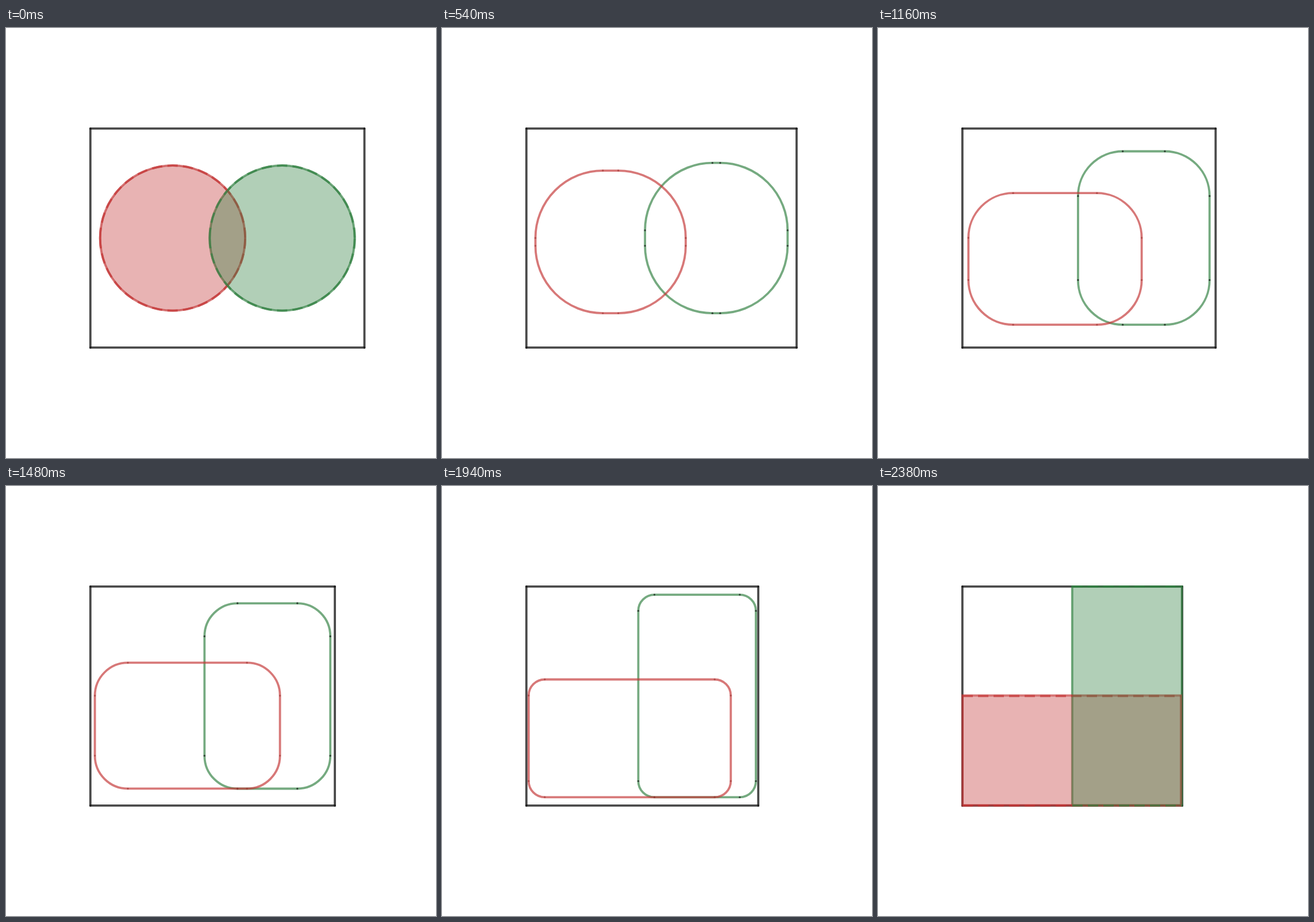
Write an HTML page with a canvas that moves like this. It is 748 px wide and 748 px high and loops after 2.8 s.

```html
<!DOCTYPE html>
<html>
<head>
<meta charset="utf-8">
<style>
  html, body { margin: 0; width: 100%; height: 100%; overflow: hidden; background: #fff; }
  canvas { display: block; }
</style>
</head>
<body>
<canvas id="stage" width="748" height="748"></canvas>
<script>
const ctx = document.getElementById('stage').getContext('2d');
const LOOP = 2800, HOLD = 400, STEP = 20, STEPS = 99;
const LINE = 3.8, RADIUS = 126.2, DASH = [18, 9];
const LEFT = 146.8, TOP = 174.9, BOTTOM = 555.9;
const FRAME = 'rgba(20,20,20,.77)';

// Bounds are [left, top, right, bottom], from circle to rectangle.
const red = {
  rgb: '195,55,55', dot: 'rgba(150,50,45,.55)',
  from: [163.7, 239.2, 416.1, 491.6], to: [147, 364.3, 527, 555.5],
  area: [147, 365.4, 528, 555.9]
};
const green = {
  rgb: '50,129,66', dot: 'rgba(35,45,38,.8)',
  from: [354.3, 239.2, 606.7, 491.6], to: [337.8, 174.8, 528.7, 555.6],
  area: [337.8, 174.8, 528.7, 555.9]
};

const mix = (a, b, p) => a + (b - a) * p;
const ink = (shape, alpha) => `rgba(${shape.rgb},${alpha})`;

function line(x1, y1, x2, y2) {
  ctx.beginPath();
  ctx.moveTo(x1, y1);
  ctx.lineTo(x2, y2);
  ctx.stroke();
}

function drawFrame(p) {
  const right = mix(623.5, 529.2, p);
  ctx.strokeStyle = FRAME;
  ctx.lineCap = 'round';
  line(LEFT, TOP, right, TOP);
  line(right, TOP, right, BOTTOM);
  line(right, BOTTOM, LEFT, BOTTOM);
  line(LEFT, BOTTOM, LEFT, TOP);
  ctx.lineCap = 'butt';
}

function outline(shape, p) {
  const [l, t, r, b] = shape.from.map((v, i) => mix(v, shape.to[i], p));
  const rad = RADIUS * (1 - p);
  ctx.strokeStyle = ink(shape, .67);
  ctx.beginPath();
  ctx.roundRect(l, t, r - l, b - t, rad);
  ctx.stroke();
  if (p === 0 || p === 1) return;
  ctx.fillStyle = shape.dot;
  const dot = (x, y) => {
    ctx.beginPath();
    ctx.arc(x, y, 1.7, 0, 7);
    ctx.fill();
  };
  for (const x of [l + rad, r - rad]) { dot(x, t); dot(x, b); }
  for (const y of [t + rad, b - rad]) { dot(l, y); dot(r, y); }
}

// The filled area, with a dashed upper and lower boundary.
function region(shape, round) {
  const [l, t, r, b] = round ? shape.from : shape.area;
  ctx.fillStyle = ink(shape, .38);
  ctx.beginPath();
  ctx.roundRect(l, t, r - l, b - t, round ? RADIUS : 0);
  ctx.fill();

  ctx.strokeStyle = ink(shape, .67);
  ctx.setLineDash(DASH);
  if (round) {
    for (const upper of [true, false]) {
      ctx.beginPath();
      ctx.arc((l + r) / 2, (t + b) / 2, RADIUS, Math.PI, 0, !upper);
      ctx.stroke();
    }
  } else {
    line(l, t, r, t);
    line(l, b, r, b);
  }
  ctx.setLineDash([]);
}

function draw(time) {
  const step = Math.floor((time % LOOP - HOLD) / STEP);
  const p = Math.min(STEPS, Math.max(0, step)) / STEPS;
  ctx.clearRect(0, 0, 748, 748);
  ctx.lineWidth = LINE;
  drawFrame(p);
  [green, red].forEach(s => outline(s, p));
  if (p === 0 || p === 1) [red, green].forEach(s => region(s, p === 0));
}

const start = performance.now();
function tick() {
  draw(performance.now() - start);
  requestAnimationFrame(tick);
}
tick();
</script>
</body>
</html>
```
